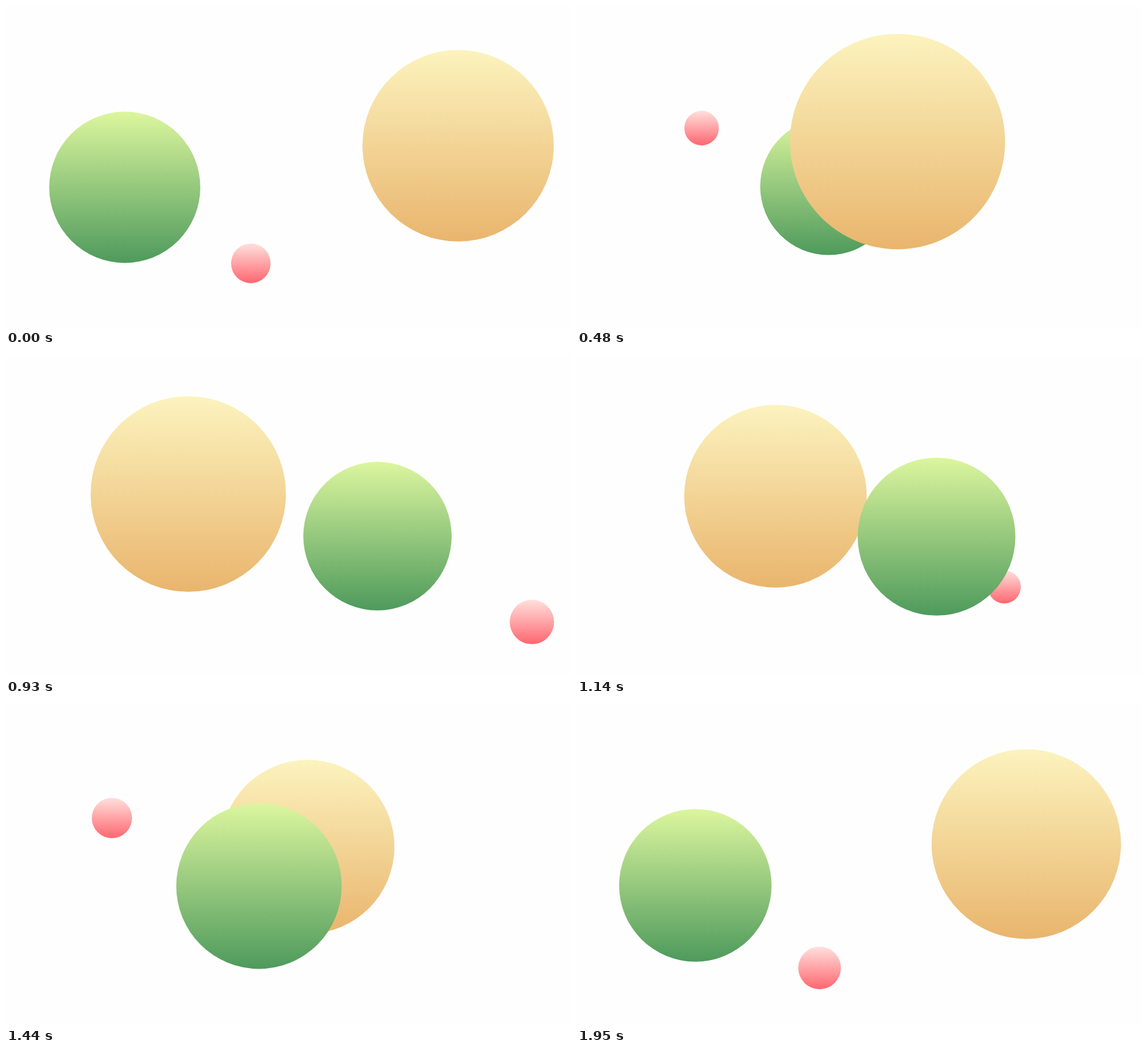
An HTML page that plays this animation: 994 by 564 pixels, repeating every 1980 ms.

```html
<!DOCTYPE html>
<html lang="en">
<head>
<meta charset="utf-8">
<title>Orbiting spheres</title>
<style>
  html, body { margin: 0; width: 100%; height: 100%; overflow: hidden; background: #fefefe; }
  svg { display: block; width: 100%; height: 100%; }
</style>
</head>
<body>
<svg id="stage" viewBox="0 0 994 564"></svg>
<script>
const LOOP = 1980, STEP = 30;
const VANISH = { x: 492, y: 304 };
const SUN_SIZE = 1.279, MOON_SIZE = 0.25; // relative to the planet
const { sin, cos, PI } = Math;
const stage = document.getElementById('stage');

function node(name, attrs, parent) {
  const el = document.createElementNS('http://www.w3.org/2000/svg', name);
  for (const key in attrs) el.setAttribute(key, attrs[key]);
  return parent.appendChild(el);
}

function sphere(id, size, top, bottom) {
  const gradient = node('linearGradient', { id, x1: 0, y1: 0, x2: 0, y2: 1 }, defs);
  node('stop', { offset: 0, 'stop-color': top }, gradient);
  node('stop', { offset: 1, 'stop-color': bottom }, gradient);
  return { size, el: node('circle', { fill: `url(#${id})` }, stage) };
}

const defs = node('defs', {}, stage);
const sun = sphere('sun', SUN_SIZE, '#fcf3be', '#e9b56d');
const planet = sphere('planet', 1, '#dcf69e', '#4e9a5c');
const moon = sphere('moon', MOON_SIZE, '#ffe0dc', '#ff6670');

// Positions are in units of the planet's radius; z is the depth,
// scaled so that a radius of 1 at depth z covers 1000 / z pixels.
const sunOrbit = a => ({
  x: SUN_SIZE * (.385 + 1.418 * cos(a) - .04 * sin(a) + .033 * sin(3 * a)),
  y: SUN_SIZE * -.348,
  z: SUN_SIZE * (5.93 - .635 * sin(a) + .012 * cos(2 * a))
});

const planetOrbit = a => ({
  x: -.44 - 1.69 * cos(a) + .09 * sin(a) - .04 * sin(2 * a) - .025 * sin(3 * a),
  y: .109,
  z: 7.555 + .72 * sin(a) - .03 * cos(2 * a)
});

// The moon circles the planet twice per loop on a tilted ellipse
function moonOrbit(a, centre) {
  const turn = 2 * a, eased = turn - .3 * sin(2 * turn);
  return {
    x: centre.x - .105 + 1.735 * cos(eased) + .03 * sin(eased) + .06 * cos(a),
    y: centre.y + .105 + .9 * cos(eased) - .03 * sin(eased) - .05 * cos(2 * eased),
    z: centre.z - .12 - .22 * cos(turn) + 1.12 * sin(turn) + .7 * sin(2 * turn) - .15 * sin(a)
  };
}

function place({ el, size }, { x, y, z }) {
  const scale = 1000 / z;
  el.setAttribute('cx', (VANISH.x + x * scale).toFixed(2));
  el.setAttribute('cy', (VANISH.y + y * scale).toFixed(2));
  el.setAttribute('r', (size * scale).toFixed(2));
}

function draw(time) {
  const a = time / LOOP * 2 * PI;
  const centre = planetOrbit(a);
  const bodies = [[sun, sunOrbit(a)], [planet, centre], [moon, moonOrbit(a, centre)]];
  bodies.sort((p, q) => q[1].z - p[1].z);
  for (const [body, position] of bodies) {
    place(body, position);
    stage.appendChild(body.el);
  }
}

let start;
function tick(now) {
  start ??= now;
  draw(Math.floor((now - start) % LOOP / STEP) * STEP);
  requestAnimationFrame(tick);
}
draw(0);
requestAnimationFrame(tick);
</script>
</body>
</html>
```
